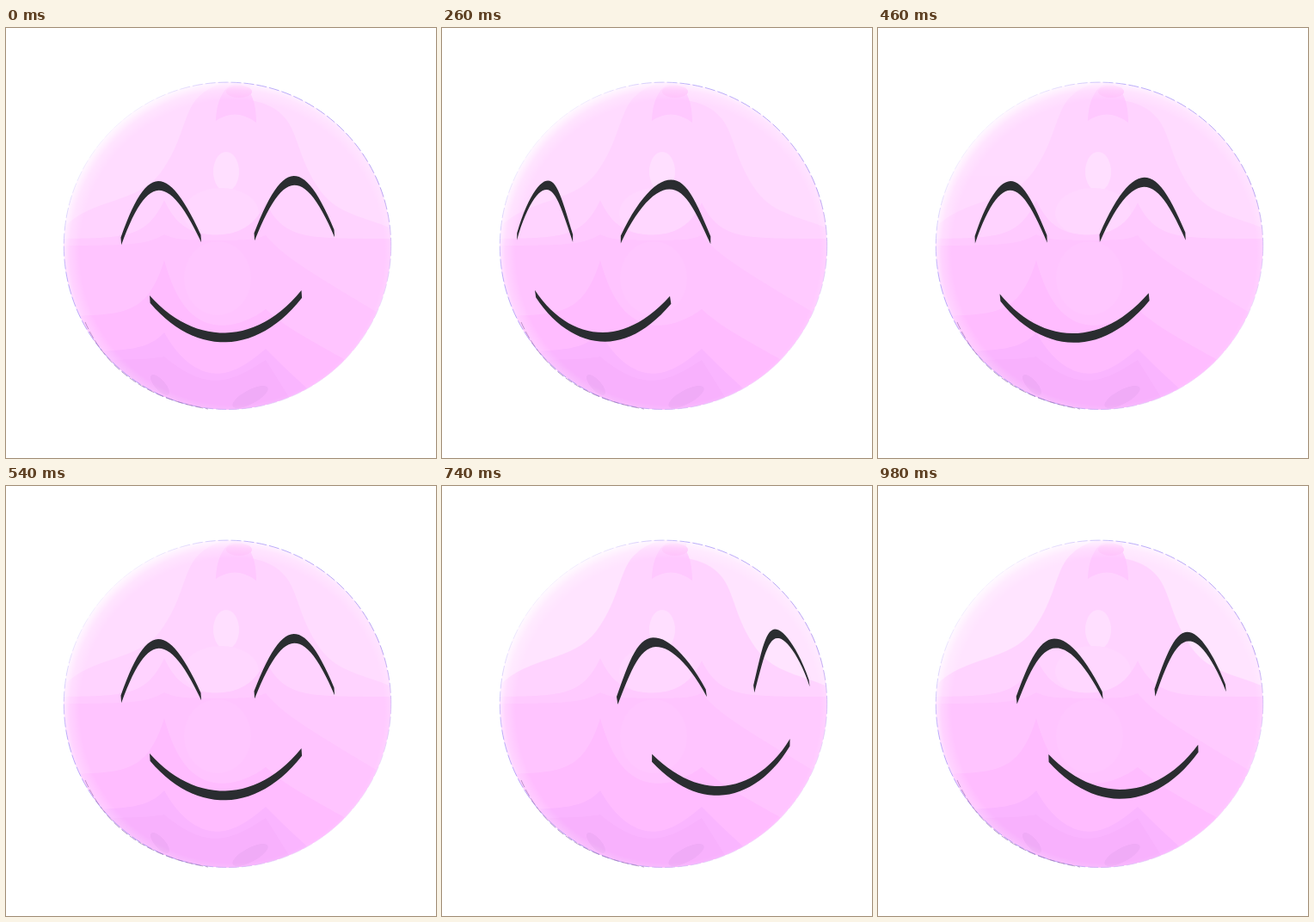
Recreate the animation shown at these times as an HTML page. Size 500 by 500 pixels, loop 1 s.

```html
<!DOCTYPE html>
<html lang="en">
<head>
<meta charset="utf-8">
<title>Swaying smile</title>
<style>
  html, body { margin: 0; width: 100%; height: 100%; overflow: hidden; background: #fff; }
  svg { display: block; width: 100vw; height: 100vh; }
</style>
</head>
<body>
<svg viewBox="0 0 500 500">
  <defs>
    <clipPath id="ball"><circle cx="257.5" cy="253.3" r="190"/></clipPath>
    <radialGradient id="rim" gradientUnits="userSpaceOnUse" cx="263" cy="261" r="199">
      <stop offset=".89" stop-color="#fff" stop-opacity="0"/>
      <stop offset=".95" stop-color="#fff" stop-opacity=".25"/>
      <stop offset="1" stop-color="#fff" stop-opacity=".8"/>
    </radialGradient>
    <linearGradient id="edge" x1="0" y1="0" x2="1" y2="1">
      <stop offset=".12" stop-color="#fff"/>
      <stop offset=".3" stop-color="#a99cf8"/>
      <stop offset=".65" stop-color="#a58fee"/>
      <stop offset=".85" stop-color="#f3dcfb"/>
    </linearGradient>
    <path id="light" d="M60 240C95 195 150 208 180 168C206 132 206 100 222 82Q236 66 262 62V0H0V240Z"/>
  </defs>

  <g clip-path="url(#ball)">
    <rect width="500" height="500" fill="#ffd3ff"/>
    <g id="lights" fill="#ffe4ff">
      <use href="#light"/>
      <use href="#light" transform="translate(546 22) scale(-1 1)"/>
    </g>
    <ellipse cx="256" cy="167" rx="15" ry="23" fill="#ffdfff"/>
    <ellipse cx="250" cy="215" rx="44" ry="29" fill="#ffd7ff"/>
    <path d="M244 108C246 50 292 50 291 110Q267 92 244 108Z" fill="#ffc8ff"/>
    <ellipse cx="271" cy="74" rx="15" ry="7" fill="#ffc0fc"/>
    <g id="bands"></g>
    <g fill="#f0abf7">
      <ellipse cx="179" cy="415" rx="15" ry="6" transform="rotate(48 179 415)"/>
      <ellipse cx="284" cy="429" rx="23" ry="8" transform="rotate(-28 284 429)"/>
    </g>
    <rect width="500" height="500" fill="url(#rim)"/>
  </g>
  <circle cx="257.5" cy="253.3" r="190.2" fill="none" stroke="url(#edge)" stroke-width=".8" stroke-dasharray="12 3"/>
  <path d="M92 342Q129 425 235 443" fill="none" stroke="#9c78b5" stroke-width=".7" stroke-dasharray="9 3"/>
  <path id="face" fill="#2a2d30"/>
</svg>

<script>
const CX = 257.5, CY = 253.3;
const R = 187, DIST = 1100;       // ball radius and camera distance
const SWAY = 21.2;                // largest turn in degrees
const LOOP = 1000, STEP = 20;

// Pen strokes: an arch between two ends through a peak.
const strokes = [
  { from: [133.5, 243.5], to: [226.5, 240.5], peak: [177, 178], round: 0.13 },
  { from: [288.5, 238.5], to: [381.5, 234.5], peak: [334.5, 172], round: 0.13 },
  { from: [167, 311], to: [343.5, 305], peak: [255, 354.5], round: 0.2 }
];
const NIB = 8.8, SWELL = 2;       // pen height at the ends, extra at the peak

// Shade edges: a level line with two cusps, a bowl between and a slope to the right.
const CUSP_L = 184, CUSP_R = 302;
const bands = [
  { fill: "#ffcaff", y: 245, left: 45, right: 42, bowl: 0, slope: 0 },
  { fill: "#ffc4ff", y: 253, left: 13, right: 12, bowl: -5, slope: 0.6 },
  { fill: "#ffbcff", y: 335, left: 65, right: 8, bowl: 14, slope: 0.55 },
  { fill: "#fab5ff", y: 376, left: 22, right: 3, bowl: 27, slope: 0.9 },
  { fill: "#f8b1fd", y: 386, left: 4, right: 0, bowl: 24, slope: 1.6 }
];

// Sway phase in degrees over time: a sine that advances a little unevenly.
const phaseKeys = [[0, 0], [140, 45], [380, 135], [540, 180], [740, 265], [900, 315], [980, 335], [1000, 360]];

const rad = deg => deg * Math.PI / 180;
const mix = (a, b, u) => a + (b - a) * u;
const dot = (a, b) => a[0] * b[0] + a[1] * b[1] + a[2] * b[2];
const cross = (a, b) => [
  a[1] * b[2] - a[2] * b[1],
  a[2] * b[0] - a[0] * b[2],
  a[0] * b[1] - a[1] * b[0]
];
const tilt = [0.044, 1, -0.15];
const axis = tilt.map(v => v / Math.hypot(...tilt));

function archPoint({ from, to, peak, round }, u) {
  const v = 1 - u, spread = (to[0] - from[0]) * round;
  return [0, 1].map(i => {
    const mid = (4 * peak[i] - (from[i] + to[i]) / 2) / 3;
    const s = i ? 0 : spread;
    return v * v * v * from[i] + 3 * v * u * (v * (mid - s) + u * (mid + s)) + u * u * u * to[i];
  });
}

function outline(stroke, steps = 28) {
  const top = [], bottom = [];
  for (let k = 0; k <= steps; k++) {
    const u = k / steps, [x, y] = archPoint(stroke, u);
    top.push([x, y]);
    bottom.unshift([x + 0.6, y + NIB + SWELL * 4 * u * (1 - u)]);
  }
  return top.concat(bottom);
}

function bandPath({ y, left, right, bowl, slope }) {
  const cusp = (x, at) => Math.exp(-Math.abs(x - at) / 20);
  let d = "M60 460";
  for (let x = 60; x <= 450; x += 2) {
    const u = (x - CUSP_L) / (CUSP_R - CUSP_L);
    const dip = u > 0 && u < 1 ? bowl * Math.sin(Math.PI * u) : 0;
    const fall = slope * Math.max(0, x - CUSP_R);
    const edge = y - left * cusp(x, CUSP_L) - right * cusp(x, CUSP_R) + dip + fall;
    d += `L${x} ${edge.toFixed(1)}`;
  }
  return d + "V460Z";
}

// Screen point to the front of the ball.
function lift([px, py]) {
  const x = (px - CX) / DIST, y = (py - CY) / DIST;
  const q = x * x + y * y;
  const depth = (DIST - Math.sqrt(DIST * DIST - (1 + q) * (DIST * DIST - R * R))) / (1 + q);
  return [x * depth, y * depth, DIST - depth];
}

function project([x, y, z]) {
  const s = DIST / (DIST - z);
  return (CX + x * s).toFixed(2) + " " + (CY + y * s).toFixed(2);
}

function turn(v, angle) {
  const c = Math.cos(angle), s = Math.sin(angle);
  const w = cross(axis, v), along = dot(axis, v) * (1 - c);
  return v.map((n, i) => n * c + w[i] * s + axis[i] * along);
}

function yawAt(t) {
  const i = phaseKeys.findIndex(key => key[0] > t);
  const [t0, p0] = phaseKeys[i - 1], [t1, p1] = phaseKeys[i];
  return -SWAY * Math.sin(rad(mix(p0, p1, (t - t0) / (t1 - t0))));
}

document.getElementById("bands").innerHTML =
  bands.map(b => `<path fill="${b.fill}" d="${bandPath(b)}"/>`).join("") +
  '<ellipse cx="246" cy="291" rx="39" ry="43" fill="#ffc7ff"/>';

const solids = strokes.map(s => outline(s).map(lift));
const face = document.getElementById("face");
const lights = document.getElementById("lights");

function draw(ms) {
  const t = Math.floor((ms % LOOP) / STEP) * STEP;
  const yaw = yawAt(t);
  face.setAttribute("d", solids.map(points =>
    "M" + points.map(p => project(turn(p, rad(yaw)))).join("L") + "Z").join(""));
  lights.setAttribute("opacity", Math.min(1, Math.max(0.45, 0.55 + yaw / 20)).toFixed(2));
}

const start = performance.now();
function tick() {
  draw(performance.now() - start);
  requestAnimationFrame(tick);
}
tick();
</script>
</body>
</html>
```
